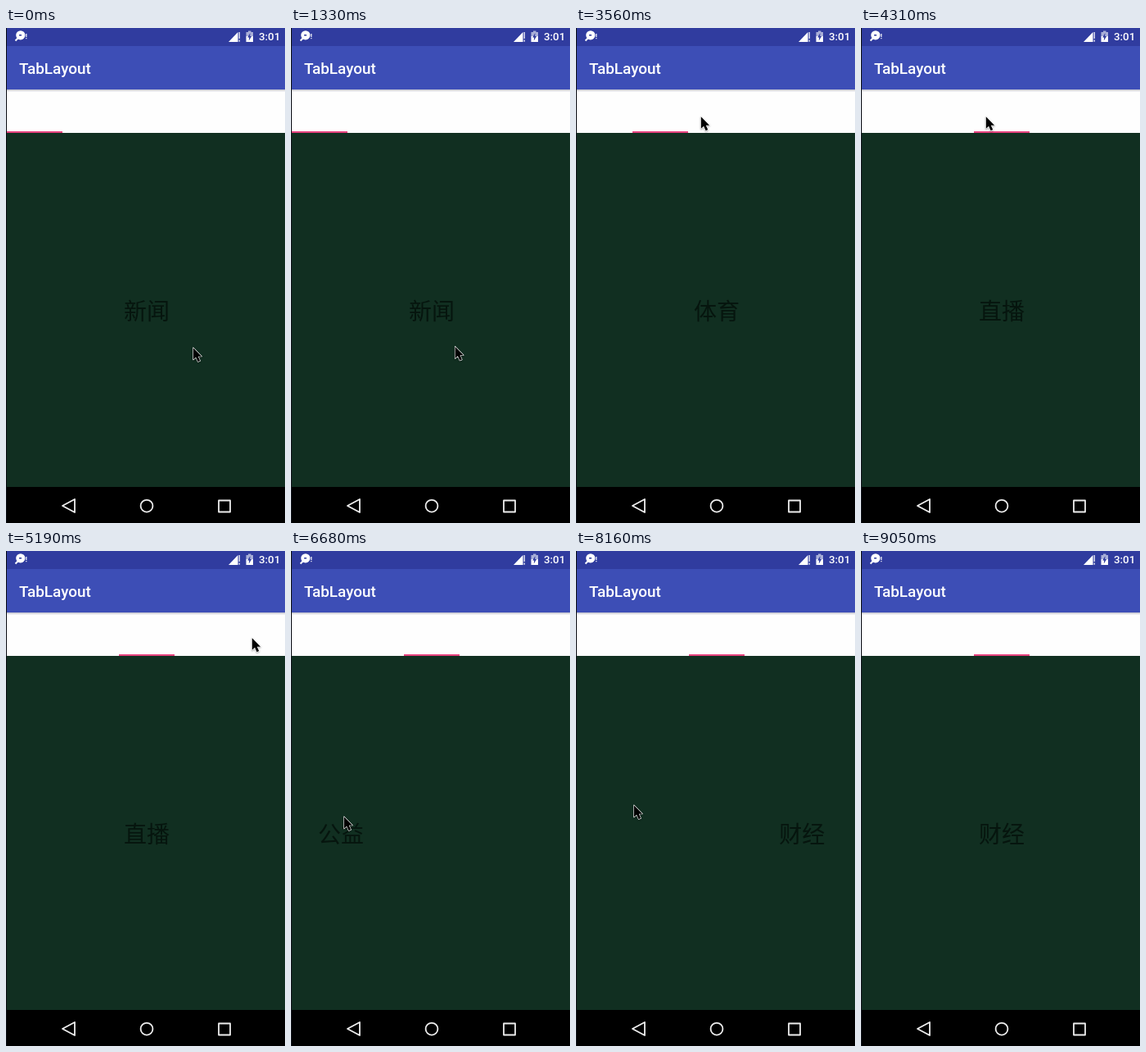
An HTML page with a canvas for the animation above (9390 ms loop, 341 by 604 pixels).

```html
<!DOCTYPE html>
<html lang="zh-CN">
<head>
<meta charset="utf-8">
<style>
html, body { margin: 0; height: 100%; overflow: hidden; background: #000; }
canvas { display: block; }
</style>
</head>
<body>
<canvas width="341" height="604"></canvas>
<script>
const ctx = document.querySelector('canvas').getContext('2d');
const LOOP = 9390, TICK = 148.4, LEAD = 11;
const WIDTH = 341, TAB = 68.5;
const PAGES = ['新闻', '体育', '直播', '公益', '财经'];

const linear = u => u;
const speedUp = u => u * u;
const smooth = u => u * u * (3 - 2 * u);
const slowDown = power => u => 1 - (1 - u) ** power;

// Moves a value to `goal` between two ticks; the screen refreshes once per tick.
function move(value, tick, from, to, goal, ease = linear) {
  const u = Math.min(1, Math.max(0, (tick - from) / (to - from)));
  return value + (goal - value) * ease(u);
}

function pageAt(tick) {
  const slide = (page, ...step) => move(page, tick, ...step);
  let page = slide(0, 19, 23, 1, smooth);
  page = slide(page, 26.5, 28.2, 2, smooth);
  page = slide(page, 36, 38, 3, slowDown(5));
  page = slide(page, 44, 46, 3.336, slowDown(5));
  page = slide(page, 46, 48, 3, slowDown(3));
  return slide(page, 52, 55.6, 4, speedUp);
}

function pointerAt(tick) {
  let x = 228, y = 389;
  const glide = (from, to, goalX, goalY, ease) => {
    x = move(x, tick, from, to, goalX, ease);
    y = move(y, tick, from, to, goalY, ease);
  };
  glide(0, 6, 255, 391);
  glide(8, 10, 34, 377, speedUp);
  glide(11, 19, 125, 111);
  glide(22, 24, 152, 107);
  glide(30, 35, 300, 105);
  glide(40, 43, 246, 323);
  glide(44, 46, 38, 323, slowDown(3));
  glide(46, 52, 258, 307);
  glide(52, 55, 70, 309);
  glide(55, 60, 283, 600);
  return [x, y];
}

function rect(color, x, y, w, h) {
  ctx.fillStyle = color;
  ctx.fillRect(x, y, w, h);
}

function path(...pts) {
  ctx.beginPath();
  pts.forEach(([x, y]) => ctx.lineTo(x, y));
  ctx.closePath();
}

function circle(x, y, r) {
  ctx.beginPath();
  ctx.arc(x, y, r, 0, 2 * Math.PI);
}

function text(str, x, y, font, color, align = 'left') {
  ctx.font = font;
  ctx.fillStyle = color;
  ctx.textAlign = align;
  ctx.fillText(str, x, y);
}

function drawStatusBar() {
  rect('#303c9f', 0, 0, WIDTH, 22);
  ctx.fillStyle = ctx.strokeStyle = '#fff';
  circle(17.8, 8.8, 5.6);
  ctx.fill();
  ctx.lineWidth = 2;
  ctx.beginPath();
  ctx.moveTo(15, 12);
  ctx.lineTo(11.5, 15.5);
  ctx.stroke();
  rect('#303c9f', 16, 8, 3, 1.5);
  rect('#fff', 24.2, 7, 1.2, 4);
  rect('#fff', 24.2, 12, 1.2, 1.2);

  ctx.fillStyle = '#fff';
  path([272, 17], [283.5, 17], [283.5, 5]);
  ctx.fill();
  rect('#fff', 284.6, 5, 1.2, 8);
  rect('#fff', 284.6, 14.5, 1.2, 2.2);

  rect('#a9afd8', 293.5, 5, 8.5, 5);
  rect('#fff', 293.5, 10, 8.5, 7);
  rect('#a9afd8', 296, 3.5, 3.5, 2);
  ctx.fillStyle = '#303c9f';
  path([298.5, 6], [295.2, 11.5], [297.2, 11.5], [296.8, 15.5], [300.2, 10], [298.2, 10]);
  ctx.fill();
  text('3:01', 309, 15.3, '500 13.3px Roboto, sans-serif', '#fff');
}

function drawHeader(page) {
  rect('#3d4eb6', 0, 22, WIDTH, 53);
  text('TabLayout', 16, 56, '500 18.94px Roboto, sans-serif', '#fff');
  rect('#fefefe', 0, 75, WIDTH, 53);
  for (let i = 0; i < 3; i++) rect(`rgba(40,44,80,${.25 - .1 * i})`, 0, 75 + i, WIDTH, 1);

  // From the third tab on, the strip scrolls and the indicator stays centred.
  rect('#e8437f', Math.round(.6 + TAB * Math.min(page, 2)), 126, 68, 2);
}

function drawNavBar() {
  rect('#000', 0, 560, WIDTH, 44);
  ctx.strokeStyle = '#eee';
  ctx.lineWidth = 1.8;
  ctx.lineJoin = 'round';
  path([69, 583], [84, 575], [84, 591]);
  ctx.stroke();
  circle(172, 583.2, 7.4);
  ctx.stroke();
  ctx.strokeRect(260, 576.5, 14, 14);
}

function drawPointer([x, y]) {
  ctx.save();
  ctx.translate(x + .8, y + 1.2);
  path([0, 0], [0, 14.5], [3.3, 11.5], [5.8, 17], [8.4, 15.9], [6, 10.5], [10.3, 10.5]);
  ctx.lineJoin = 'round';
  ctx.lineWidth = 1.2;
  ctx.fillStyle = '#000';
  ctx.strokeStyle = '#fff';
  ctx.shadowColor = 'rgba(0,0,0,.4)';
  ctx.shadowBlur = 2;
  ctx.shadowOffsetY = 1;
  ctx.stroke();
  ctx.shadowColor = 'transparent';
  ctx.fill();
  ctx.restore();
}

function draw(now) {
  const tick = Math.floor((now % LOOP + LEAD) / TICK);
  const page = pageAt(tick);

  rect('#112f21', 0, 128, WIDTH, 432);
  PAGES.forEach((name, i) => text(name, 172 + WIDTH * (i - page), 356,
    '28px "Noto Sans CJK SC", "Noto Sans CJK", sans-serif', '#06150e', 'center'));

  drawStatusBar();
  drawHeader(page);
  drawNavBar();
  rect('#0a0d14', 0, 0, 1, 604);
  if (tick <= 60) drawPointer(pointerAt(tick));
}

const start = performance.now();
(function frame() {
  draw(performance.now() - start);
  requestAnimationFrame(frame);
})();
</script>
</body>
</html>
```
